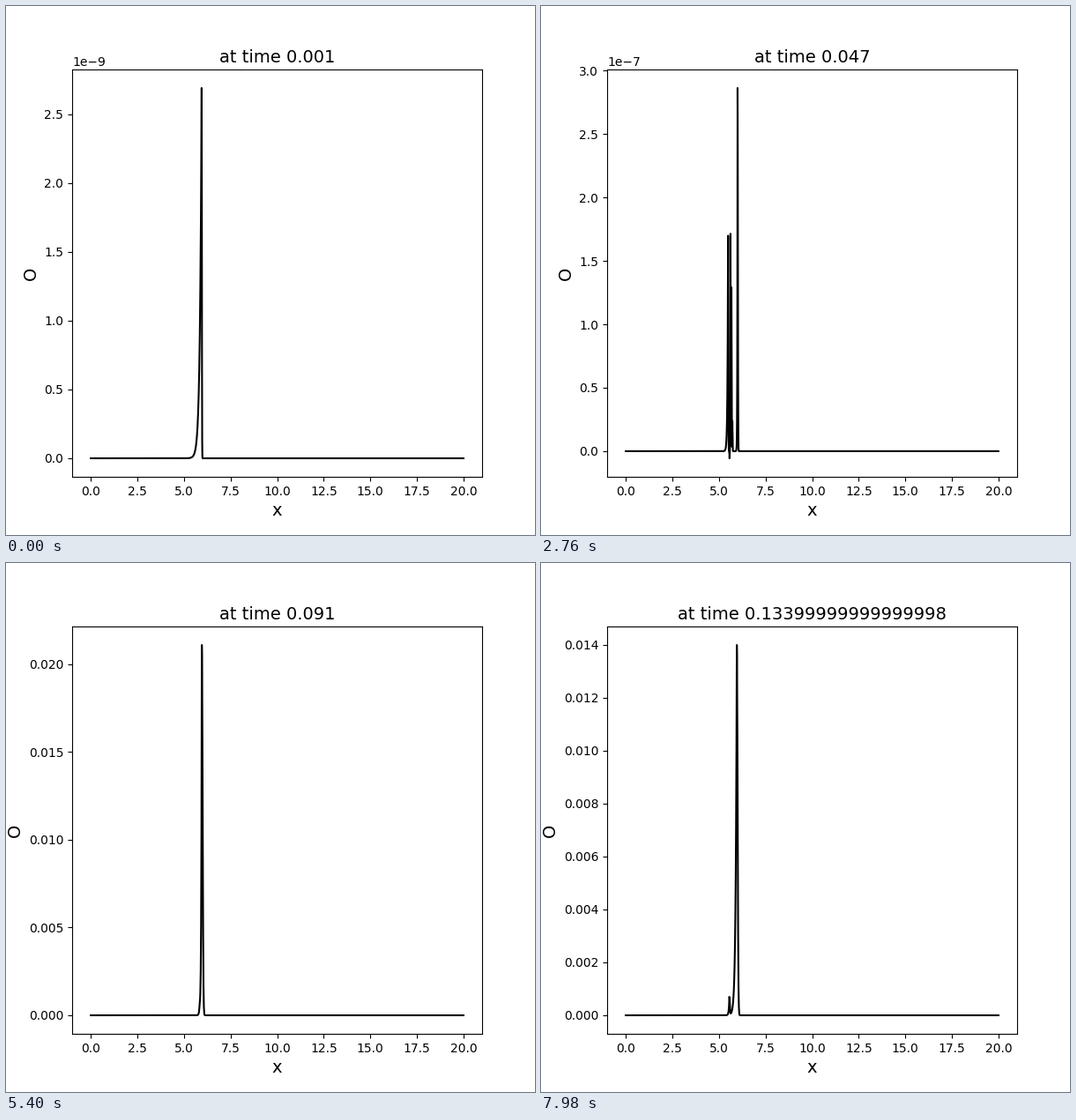
Animation, 600 px wide and 600 px high, one loop 8000 ms. Source, as a matplotlib script:

```python
import numpy as np
import matplotlib.pyplot as plt
from matplotlib.animation import FuncAnimation

FRAMES = 134
LOOP_MS = 8000
PEAK_STEP = 90

x = np.linspace(0, 20, 2001)

# Ripple heights relative to the front, early and fully grown
YOUNG = np.array([-0.046, 0.496, -0.231, -0.254])
GROWN = np.array([-0.035, 1.008, 0.76, 0.14])


def lobe(centre, height, left, right):
    """Exponential tail on the left, Gaussian fall on the right."""
    d = x - np.round(centre, 2)
    tail = np.exp(np.minimum(d, 0) / left)
    fall = np.exp(-0.5 * (np.maximum(d, 0) / right) ** 2)
    return height * tail * fall


def log_track(i, steps, values):
    return np.exp(np.interp(i, steps, np.log(values)))


def packet(i):
    """Front drifting left with a train of ripples behind it."""
    front = 5.95 - 0.051 * i ** 0.573
    height = 2.69e-9 * (i + 1) * (1 + 0.0332 * i ** 0.61)
    y = lobe(front, height, 0.03 + 0.06 * np.exp(-i / 7), 0.012)

    onset = min(i / 16, 1) ** 3
    grown = np.clip((i - 16) / 18, 0, 1)
    ripples = height * onset * (YOUNG + (GROWN - YOUNG) * grown)
    for k, ripple in enumerate(ripples, 1):
        offset = 0.05 * k - 0.01 + 0.035 * grown
        y += lobe(front + offset, ripple, 0.008, 0.01)
    return y


def pulse(i):
    """Spike growing exponentially, then decaying as a power law."""
    age = max(i - PEAK_STEP, 0)
    height = log_track(i, [0, 16, 34, 60, PEAK_STEP],
                       [1e-13, 8e-10, 3.6e-9, 4.72e-5, 0.0211])
    height *= (1 + age / 16) ** -0.315
    centre = np.interp(i, [34, 60, PEAK_STEP], [5.95, 6.05, 5.96])
    left = np.interp(i, [60, PEAK_STEP, 107], [0.012, 0.028, 0.06])
    right = np.interp(i, [34, 60, PEAK_STEP], [0.015, 0.018, 0.04])
    return lobe(centre, height, left, right)


def follower(i):
    """Small bump that leaves the spike and drifts left."""
    age = max(i - PEAK_STEP, 0)
    height = log_track(i, [60, PEAK_STEP, 107, 133],
                       [1e-9, 3.5e-4, 1.2e-3, 6.8e-4])
    return lobe(5.84 - 0.0165 * age ** 0.755, height, 0.028, 0.025)


fig, ax = plt.subplots(figsize=(6, 6), dpi=100)
line, = ax.plot(x, packet(0), color="black", linewidth=1.5)
ax.set_xlabel("x", fontsize=14)
ax.set_ylabel("O", fontsize=14)
title = ax.set_title("", fontsize=14)


def update(i):
    y = packet(i) + pulse(i)
    if i > 60:
        y += follower(i)
    line.set_ydata(y)
    ax.relim()
    ax.autoscale_view()
    title.set_text(f"at time {(i + 1) * 1000 * 1e-6}")
    return line, title


anim = FuncAnimation(fig, update, frames=FRAMES, interval=LOOP_MS / FRAMES,
                     init_func=lambda: update(0), repeat=True,
                     repeat_delay=0, blit=False)
plt.show()
```
